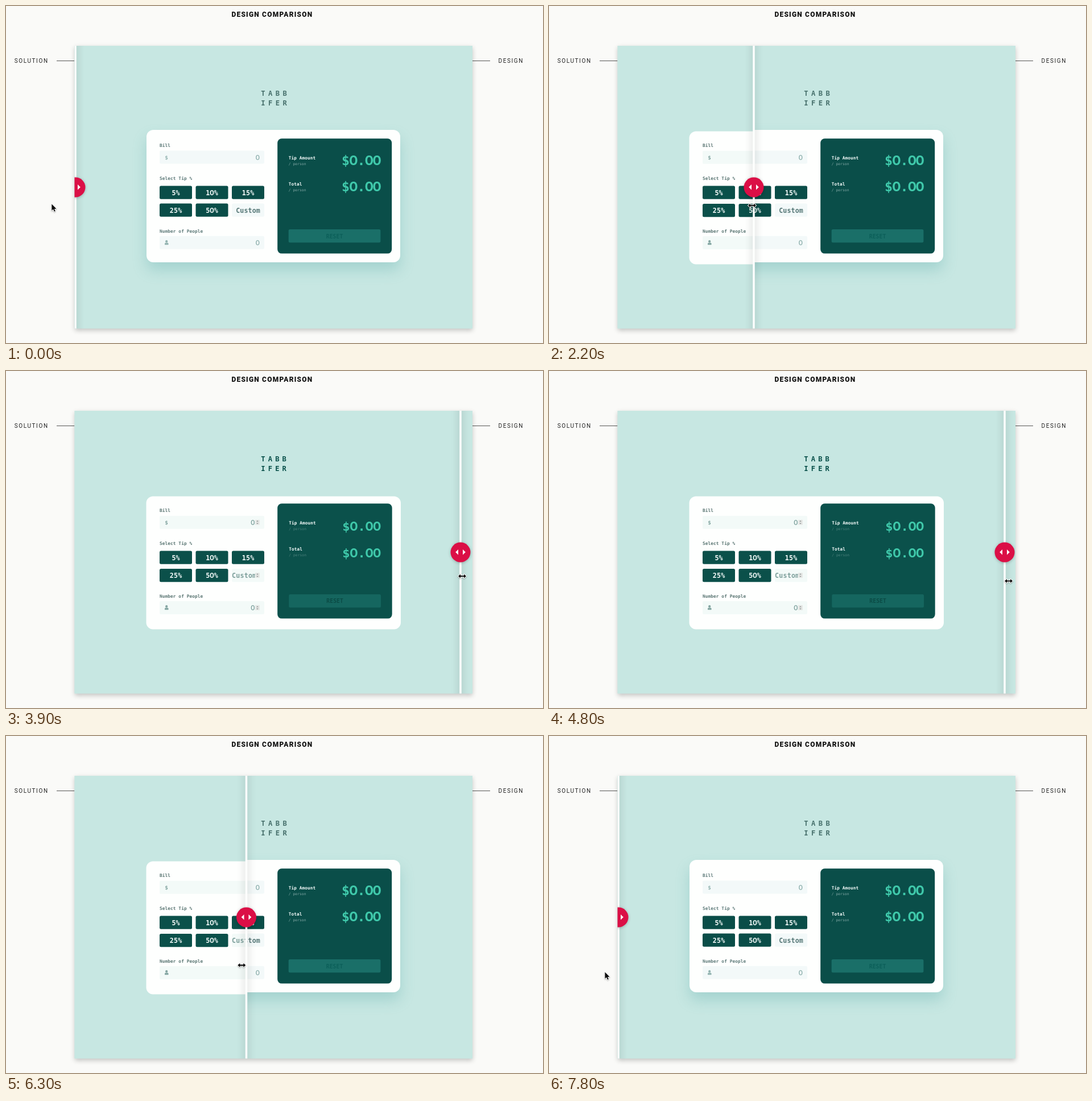
An HTML page with a canvas that plays this animation: 944x593 px, repeating every 8.7 s.

```html
<!DOCTYPE html>
<html lang="en">
<head>
<meta charset="utf-8">
<title>Design comparison</title>
<style>
  html, body { margin: 0; width: 100%; height: 100%; overflow: hidden; background: #fafaf8; }
  canvas { display: block; }
</style>
</head>
<body>
<canvas id="stage" width="944" height="593"></canvas>
<script>
const canvas = document.getElementById('stage');
const ctx = canvas.getContext('2d');
const LOOP = 8700, STEP = 100;
const BOX = { left: 120.5, top: 70, right: 820, bottom: 567.5 };
const BOX_W = BOX.right - BOX.left, BOX_H = BOX.bottom - BOX.top;
const HANDLE_Y = 319;
const MONO = '"DejaVu Sans Mono", monospace';
const SANS = 'Inter, sans-serif';
const LOGO = ['TABB', 'IFER'];

// step, slider x, pointer x, pointer y
const KEYS = [
  [7, 122, 80, 348], [11, 126, 124, 350], [16, 252, 249, 351], [22, 360, 357, 351],
  [25, 448, 445, 351], [32, 593, 590, 350], [34, 672, 671, 353], [37, 767, 768, 358],
  [39, 799, 802, 361], [41, 808, 812, 363], [42, 808, 812, 363], [44, 818, 842, 365],
  [46, 818, 842, 367], [48, 801, 808, 369.5], [51, 759, 753, 377], [57, 584, 577, 393.5],
  [60, 507, 499, 399], [69, 253.5, 245, 412], [70, 223, 214.5, 413], [74, 122, 112, 415],
  [78, 122, 98, 415]
];

const DESIGN = {
  logo: '#47706c', logoY: 153.5, logoStep: 12.7,
  card: [247, 218, 446, 233], shadow: true,
  field: '#f3f9f9', fieldDy: 0, label: '#5b7877', value: '#93b4b1', valueRight: 446,
  button: '#0a4d48', row2: 347.5,
  custom: '#557776', panel: '#0a4e49', panelW: 201, textX: 496.7,
  person: '#84a9a6', amountY: [271, 317.5], amountSize: 23.3, amountStep: 13.75,
  reset: '#1a6f68', resetX: 496.7, resetText: '#0c5f59', resetY: 405.5
};

const SOLUTION = {
  logo: '#0a514b', logoY: 154.5, logoStep: 12.4,
  card: [246.5, 220.5, 447.5, 234], shadow: false,
  field: '#f3faf8', fieldDy: 0.3, label: '#587471', value: '#84a6a2', valueRight: 437.5,
  button: '#0b504a', row2: 348,
  custom: '#7d9f9b', panel: '#0b514b', panelW: 201.5, textX: 497.2, spinners: true,
  person: '#4d827d', amountY: [273, 319.5], amountSize: 22, amountStep: 13.6,
  reset: '#15665f', resetX: 497.3, resetText: '#0b4b45', resetY: 404.5
};

function roundRect(x, y, w, h, r, color) {
  ctx.fillStyle = color;
  ctx.beginPath();
  ctx.roundRect(x, y, w, h, r);
  ctx.fill();
}

function polygon(points, color) {
  ctx.fillStyle = color;
  ctx.beginPath();
  points.forEach(([x, y]) => ctx.lineTo(x, y));
  ctx.closePath();
  ctx.fill();
}

function setShadow(color, blur, dy = 0) {
  ctx.shadowColor = color;
  ctx.shadowBlur = blur;
  ctx.shadowOffsetY = dy;
}

// Fixed-pitch text, centred vertically on its capitals; zeros are unslashed.
function mono(text, x, y, size, color, { align = 0, step = size * 0.612, weight = 700 } = {}) {
  ctx.fillStyle = color;
  ctx.textAlign = 'center';
  const left = x - text.length * step * align;
  [...text].forEach((char, i) => {
    ctx.font = `${weight} ${size}px ${char === '0' ? SANS : MONO}`;
    ctx.fillText(char, left + step * (i + 0.5), y + size * 0.365);
  });
}

function spaced(text, x, y, font, spacing) {
  ctx.font = font;
  ctx.textAlign = 'left';
  ctx.letterSpacing = spacing;
  ctx.fillText(text, x, y);
  ctx.letterSpacing = '0px';
}

function spinner(y) {
  roundRect(438, y - 4.5, 8, 9, 1, '#e6e8e6');
  for (const dir of [-1, 1]) {
    polygon([[440.2, y + dir * 1.2], [443.8, y + dir * 1.2], [442, y + dir * 3.2]], '#8d9391');
  }
}

function personIcon(y, color) {
  ctx.fillStyle = color;
  ctx.beginPath();
  ctx.arc(282.2, y - 2, 2.1, 0, Math.PI * 2);
  ctx.fill();
  roundRect(279, y + 0.2, 6.6, 3.8, [2, 2, 0.6, 0.6], color);
}

function inputField(label, labelY, y, skin) {
  mono(label, 270, labelY, 7.78, skin.label);
  roundRect(270, y + skin.fieldDy, 184, 23, 2.5, skin.field);
  mono('0', skin.valueRight, y + 12, 11.65, skin.value, { align: 1, weight: 600 });
  if (skin.spinners) spinner(y + 11.8);
}

function tipButtons(skin) {
  mono('Select Tip %', 270, 303, 7.78, skin.label);
  ['5%', '10%', '15%', '25%', '50%'].forEach((text, i) => {
    const x = 270 + (i % 3) * 63.5;
    const y = i < 3 ? 316.5 : skin.row2;
    roundRect(x, y, 57, 23.2, 2.5, skin.button);
    mono(text, x + 28.5, y + 12, 11.65, '#f4fbfa', { align: 0.5 });
  });
  roundRect(397, skin.row2, 57, 23.2, 2.5, skin.field);
  if (skin.spinners) {
    ctx.save();
    ctx.beginPath();
    ctx.rect(397, 345, 41, 30);
    ctx.clip();
    mono('Custom', 397, 359.8, 11.65, skin.custom, { step: 7.2 });
    ctx.restore();
    spinner(359.5);
  } else {
    mono('Custom', 425.5, 359.5, 11.65, skin.custom, { align: 0.5 });
  }
}

function resultPanel(skin) {
  roundRect(477.2, 233.2, skin.panelW, 202.4, 7.5, skin.panel);
  ['Tip Amount', 'Total'].forEach((text, i) => {
    const y = 266.7 + i * 46.7;
    mono(text, skin.textX, y, 7.78, '#f4fbfa');
    mono('/ person', skin.textX, y + 10.7, 6.3, skin.person, { weight: 400 });
    mono('$0.00', 659, skin.amountY[i], skin.amountSize, '#3fc8aa',
      { align: 1, step: skin.amountStep });
  });
  roundRect(skin.resetX, 393, 161.7, 23.2, 2.5, skin.reset);
  mono('RESET', skin.resetX + 80.8, skin.resetY, 9.7, skin.resetText, { align: 0.5 });
}

function drawApp(skin) {
  ctx.fillStyle = '#c7e7e2';
  ctx.fillRect(BOX.left, BOX.top, BOX_W, BOX_H);
  LOGO.forEach((row, i) => {
    mono(row, 452 - skin.logoStep / 2, skin.logoY + i * 17.5, 12.2, skin.logo, { step: skin.logoStep });
  });
  ctx.save();
  if (skin.shadow) setShadow('rgba(70, 160, 160, 0.27)', 24, 14);
  roundRect(...skin.card, 12, '#fefffe');
  ctx.restore();
  inputField('Bill', 245.3, 254.4, skin);
  mono('$', 282, 266.4, 9.4, skin.value, { align: 0.5 });
  tipButtons(skin);
  inputField('Number of People', 396.3, 404.8, skin);
  personIcon(416.2, skin.value);
  resultPanel(skin);
}

function clipped(x, w, draw) {
  ctx.save();
  ctx.beginPath();
  ctx.rect(x, BOX.top, w, BOX_H);
  ctx.clip();
  draw();
  ctx.restore();
}

function drawSlider(x) {
  ctx.save();
  setShadow('rgba(0, 0, 0, 0.3)', 14);
  ctx.fillStyle = '#fdfefd';
  ctx.fillRect(x - 1.75, BOX.top - 20, 3.5, BOX_H + 40);
  setShadow('rgba(0, 0, 0, 0.25)', 5, 1);
  ctx.fillStyle = '#db0f46';
  ctx.beginPath();
  ctx.arc(x, HANDLE_Y, 17.5, 0, Math.PI * 2);
  ctx.fill();
  ctx.restore();
  for (const dir of [-1, 1]) {
    polygon([[x + dir * 4, HANDLE_Y - 5], [x + dir * 8.8, HANDLE_Y - 0.3], [x + dir * 4, HANDLE_Y + 4.5]], '#fff');
  }
}

function drawPointer(x, y) {
  const inside = x > BOX.left && x < BOX.right;
  const half = [[-7, 0], [-3, -3.6], [-3, -1.1], [3, -1.1], [3, -3.6]];
  const shape = inside
    ? [...half, ...half.map(([a, b]) => [-a, -b])]
    : [[0.4, 0.4], [0.4, 12], [3, 9.6], [4.9, 13.8], [6.8, 13], [5, 8.9], [8.5, 8.7]];
  ctx.save();
  ctx.translate(x, y);
  setShadow('rgba(0, 0, 0, 0.3)', 2, 1);
  ctx.strokeStyle = '#fff';
  ctx.lineWidth = 1.8;
  ctx.lineJoin = 'round';
  ctx.beginPath();
  shape.forEach(([a, b]) => ctx.lineTo(a, b));
  ctx.closePath();
  ctx.stroke();
  setShadow('transparent', 0);
  polygon(shape, '#0b0b0b');
  ctx.restore();
}

function drawPage() {
  ctx.fillStyle = '#fafaf8';
  ctx.fillRect(0, 0, canvas.width, canvas.height);
  ctx.fillStyle = '#111';
  spaced('DESIGN COMPARISON', 396.5, 18.8, '900 12px Roboto, sans-serif', '1.2px');
  ctx.fillStyle = '#222';
  spaced('SOLUTION', 14.7, 100.2, '400 10px Roboto, sans-serif', '1.6px');
  spaced('DESIGN', 865.5, 100.2, '400 10px Roboto, sans-serif', '1.6px');
  ctx.fillStyle = '#555';
  ctx.fillRect(89, 96, 31.5, 1);
  ctx.fillRect(820, 96, 31, 1);
  ctx.save();
  setShadow('rgba(0, 0, 0, 0.22)', 8, 3);
  ctx.fillStyle = '#c7e7e2';
  ctx.fillRect(BOX.left, BOX.top, BOX_W, BOX_H);
  ctx.restore();
}

function poseAt(step) {
  const next = KEYS.findIndex(key => key[0] >= step);
  if (next < 0) return KEYS[KEYS.length - 1];
  if (next === 0) return KEYS[0];
  const a = KEYS[next - 1], b = KEYS[next];
  const part = (step - a[0]) / (b[0] - a[0]);
  return a.map((value, i) => value + (b[i] - value) * part);
}

function render(now) {
  const [, slider, pointerX, pointerY] = poseAt(Math.floor((now % LOOP) / STEP));
  drawPage();
  clipped(BOX.left, slider - BOX.left, () => drawApp(SOLUTION));
  clipped(slider, BOX.right - slider, () => drawApp(DESIGN));
  clipped(BOX.left, BOX_W, () => drawSlider(slider));
  drawPointer(pointerX, pointerY);
}

function tick() {
  render(performance.now());
  requestAnimationFrame(tick);
}
tick();
</script>
</body>
</html>
```
